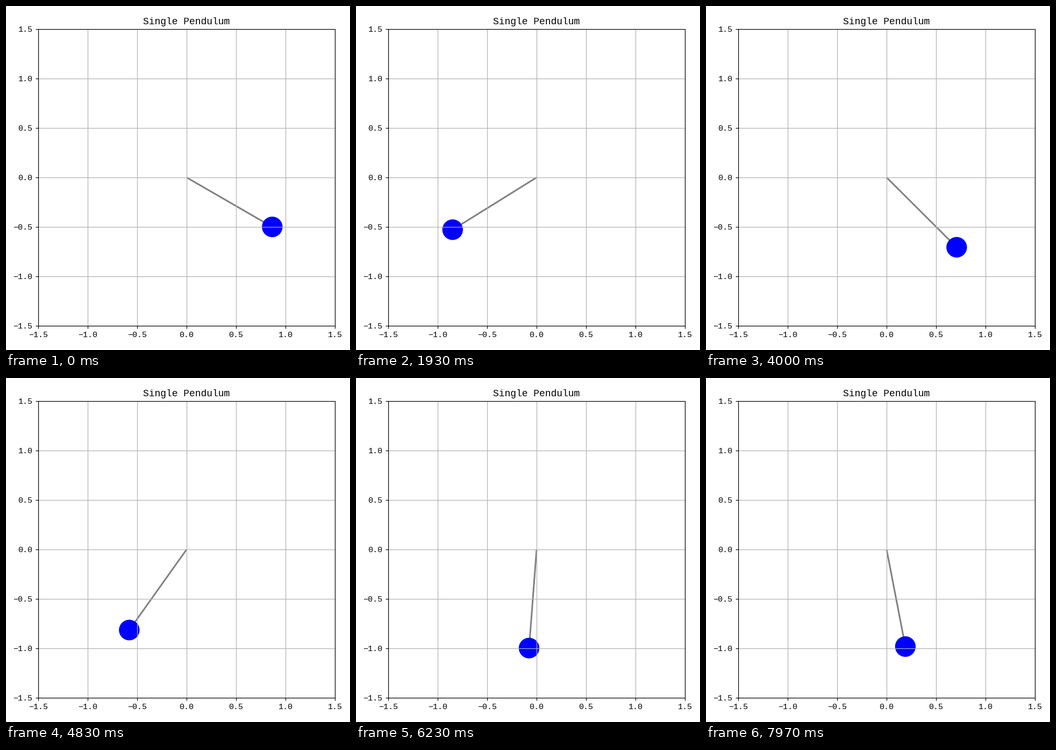
Write a matplotlib script that moves like this. It is 640 px wide and 640 px high and loops after 8000 ms.

```python
import math

import matplotlib.pyplot as plt
from matplotlib.animation import FuncAnimation
from matplotlib.patches import Circle

SIZE, DPI = 640, 108
TICKS, TICK_MS = 640, 12.5      # display ticks in one loop of 8 s
POSES, POSE_MS = 240, 100 / 3   # poses change on whole 10 ms steps
LEAD_MS = 10

GRAVITY, LENGTH = 9.8, 1.0
STEP, STEPS_PER_POSE = 0.01, 2

plt.rcParams["font.family"] = "Liberation Mono"


def swing(count):
    """Angle of the pendulum at each pose, by semi-implicit Euler."""
    theta, omega = math.radians(60), 0.0
    angles = []
    for _ in range(count):
        angles.append(theta)
        for _ in range(STEPS_PER_POSE):
            omega -= GRAVITY / LENGTH * math.sin(theta) * STEP
            theta += omega * STEP
    return angles


angles = swing(POSES)

fig = plt.figure(figsize=(SIZE / DPI, SIZE / DPI), dpi=DPI, facecolor="white")
ax = fig.add_axes([60 / SIZE, 45 / SIZE, 552 / SIZE, 552 / SIZE])
ax.set(xlim=(-1.5, 1.5), ylim=(-1.5, 1.5))
marks = [i / 2 for i in range(-3, 4)]
ax.set_xticks(marks)
ax.set_yticks(marks)
ax.tick_params(labelsize=10)
ax.set_title("Single Pendulum", fontsize=12, y=1.0)
ax.grid(True, color="#b0b0b0", linewidth=0.8)

# The grid (zorder 1.5) runs over both rod and bob.
rod, = ax.plot([], [], color="gray", lw=2, solid_capstyle="butt", zorder=0.9)
bob = ax.add_patch(Circle((0, 0), 0.1, facecolor="blue", edgecolor="blue",
                          linewidth=1, zorder=1))


def update(tick):
    theta = angles[int((tick * TICK_MS + LEAD_MS) / POSE_MS)]
    x, y = LENGTH * math.sin(theta), -LENGTH * math.cos(theta)
    rod.set_data([0, x], [0, y])
    bob.center = (x, y)
    return rod, bob


anim = FuncAnimation(fig, update, frames=TICKS, interval=TICK_MS,
                     init_func=lambda: update(0), repeat=True,
                     repeat_delay=0, blit=False)
plt.show()
```
